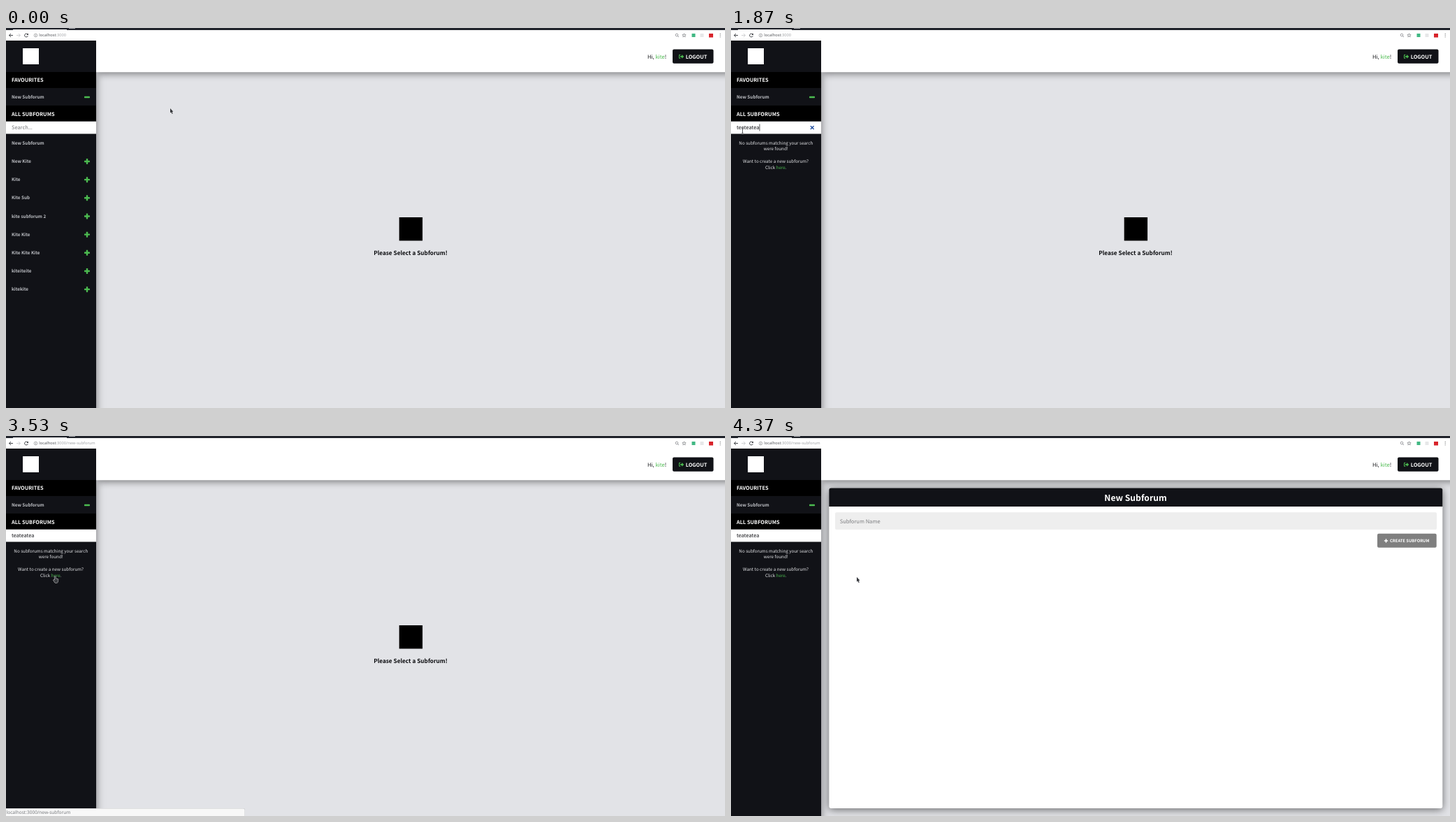
These frames come from a looping animation (1029 px wide and 544 px high, 4630 ms). An HTML page with a canvas:

```html
<!DOCTYPE html>
<html lang="en">
<head>
<meta charset="utf-8">
<title>Forum search</title>
<style>
html, body { margin: 0; width: 100%; height: 100%; overflow: hidden; background: #e2e3e7; }
canvas { display: block; width: 1029px; height: 544px; }
</style>
</head>
<body>
<canvas id="stage" width="1029" height="544"></canvas>
<script>
const ctx = document.getElementById('stage').getContext('2d');
const LOOP = 4630;
const SANS = '"Noto Sans CJK JP", "Noto Sans CJK SC", "Noto Sans", sans-serif';
const UI = '"Noto Sans", "Open Sans", sans-serif';
const INK = '#111217', GREEN = '#4cbb50', PAGE = '#e2e3e7', MUTED = '#bcbec3';

const KEYS = [1100, 1170, 1230, 1430, 1670, 1730, 1770, 1830, 1870];
const QUERY = 'teateatea';
const FORUMS = ['New Subforum', 'New Kite', 'Kite', 'Kite Sub', 'kite subforum 2',
  'Kite Kite', 'Kite Kite Kite', 'kiteiteite', 'kitekite'];
const T = { focus: 700, narrowed: 1170, empty: 1270, hover: 2870, click: 3420, route: 3500, page: 3600, idle: 4270 };

// time, x, y of the pointer's hot spot
const PATH = [
  [0, 235, 115], [130, 235, 115], [630, 16, 146], [2080, 16.5, 147],
  [2600, 70, 191], [2630, 70.5, 195], [2900, 70, 201],
  [3800, 70, 201], [4110, 180, 202], [LOOP, 180, 202]
];

const clamp = v => Math.max(0, Math.min(1, v));
const span = (t, a, b) => clamp((t - a) / (b - a));
const smooth = v => v * v * (3 - 2 * v);

function rect(x, y, w, h, color, radius = 0) {
  ctx.fillStyle = color;
  ctx.beginPath();
  ctx.roundRect(x, y, w, h, radius);
  ctx.fill();
}

function line(points, color, width, close) {
  ctx.beginPath();
  points.forEach(([x, y]) => ctx.lineTo(x, y));
  if (close) ctx.closePath();
  ctx.strokeStyle = color;
  ctx.lineWidth = width;
  ctx.stroke();
}

function ring(x, y, r, color, width, from = 0, to = Math.PI * 2) {
  ctx.beginPath();
  ctx.arc(x, y, r, from, to);
  ctx.strokeStyle = color;
  ctx.lineWidth = width;
  ctx.stroke();
}

// y is the middle of the capitals; returns the x where the text ends
function text(str, x, y, size, color, { weight = 400, align = 'left', font = SANS } = {}) {
  ctx.font = `${weight} ${size}px ${font}`;
  ctx.textAlign = align;
  ctx.fillStyle = color;
  ctx.fillText(str, x, y + size * 0.37);
  return x + ctx.measureText(str).width;
}

function shadowed(blur, dy, alpha, draw) {
  ctx.save();
  ctx.shadowColor = `rgba(0,0,0,${alpha})`;
  ctx.shadowBlur = blur;
  ctx.shadowOffsetY = dy;
  draw();
  ctx.restore();
}

function plus(x, y, size, color) {
  const bar = size * 0.3;
  rect(x - size / 2, y - bar / 2, size, bar, color, 0.6);
  rect(x - bar / 2, y - size / 2, bar, size, color, 0.6);
}

function drawBrowser(t) {
  rect(0, 0, 1029, 18, '#fff');
  rect(0, 0, 1029, 3, '#20232b');
  rect(10, 2, 77, 1, '#f2f2f2');
  rect(90, 0, 9, 1, '#a9abb0');

  const dark = '#4a4c50';
  line([[10, 10.5], [4.5, 10.5]], dark, 1);
  line([[7, 8], [4.5, 10.5], [7, 13]], dark, 1);
  line([[15, 10.5], [20.5, 10.5]], '#d0d1d3', 1);
  line([[18, 8], [20.5, 10.5], [18, 13]], '#d0d1d3', 1);
  ring(29, 10.5, 2.4, dark, 1, 0.3, 5.4);
  rect(30, 8, 2, 2, dark);
  ring(42.5, 10.5, 2.3, '#77797d', 0.6);
  rect(42.2, 10, 0.7, 1.8, '#77797d');
  rect(42.2, 8.9, 0.7, 0.7, '#77797d');

  const host = text('localhost', 47.3, 10.3, 5.72, '#55575b', { font: UI });
  text(':3000' + (t >= T.route ? '/new-subforum' : ''), host, 10.3, 5.72, '#a3a5a8', { font: UI });

  ring(960, 10, 1.8, '#77797d', 0.7);
  line([[961.3, 11.3], [963, 13]], '#77797d', 0.8);
  const star = Array.from({ length: 10 }, (_, i) => {
    const r = i % 2 ? 1.2 : 2.8, a = i * Math.PI / 5 - Math.PI / 2;
    return [970.5 + r * Math.cos(a), 10.6 + r * Math.sin(a)];
  });
  line(star, '#66686c', 0.6, true);
  rect(981.5, 8, 5, 5, '#41b883');
  rect(993.5, 8, 5, 5, '#e6e7e8');
  rect(1006, 8, 6, 5.5, '#d8232a');
  for (const y of [8.3, 10.5, 12.7]) rect(1021.6, y - 0.5, 1.1, 1.1, dark, 0.55);
}

function drawHeader() {
  shadowed(11, 2, 0.55, () => rect(129, 18, 920, 45.3, '#fff'));
  const name = text('Hi, ', 918, 41, 7.6, '#15161a');
  const end = text('kite', name, 41, 7.6, GREEN);
  text('!', end, 41, 7.6, '#15161a');

  rect(954, 30.5, 58.5, 20.3, INK, 2);
  line([[965.3, 38.4], [963.5, 38.4], [963.5, 43.3], [965.3, 43.3]], GREEN, 1);
  rect(965, 40, 2.8, 1.8, GREEN);
  ctx.beginPath();
  ctx.moveTo(967.2, 38);
  ctx.lineTo(970.2, 40.9);
  ctx.lineTo(967.2, 43.8);
  ctx.fill();
  text('LOGOUT', 972.7, 41, 7.36, '#fff', { weight: 600 });
}

function drawWelcome() {
  rect(562.7, 271, 33.4, 33.4, '#000');
  text('Please Select a Subforum!', 579, 322, 8.25, '#0c0d10', { weight: 600, align: 'center' });
}

function drawForm() {
  shadowed(12, 2, 0.55, () => rect(140.3, 74.5, 878, 458.5, '#fff', 3));
  rect(140.3, 74.5, 878, 26.5, INK, [3, 3, 0, 0]);
  text('New Subforum', 579, 88, 12.2, '#fff', { weight: 600, align: 'center' });
  rect(149, 109.3, 861, 24.7, '#eee', 2);
  text('Subforum Name', 155.7, 121.8, 7.57, '#7b7c7f');
  rect(925, 139.7, 84.7, 20, '#7f7f7f', 2);
  plus(937.5, 150, 5.4, '#fff');
  text('CREATE SUBFORUM', 943, 149.8, 5.85, '#fff', { weight: 600 });
}

function drawResults(t) {
  if (t < T.empty) {
    const rows = FORUMS.slice(t < T.narrowed ? 0 : 1);
    rows.forEach((name, i) => {
      const y = 164.5 + i * 26.17;
      text(name, 8, y, 6.36, MUTED, { weight: 600 });
      if (name !== FORUMS[0]) plus(116, y + 0.3, 8, GREEN);
    });
    return;
  }
  const center = { align: 'center' }, pale = '#e4e5e8';
  text('No subforums matching your search', 64.3, 164.2, 6.3, pale, center);
  text('were found!', 64.3, 173, 6.3, pale, center);
  text('Want to create a new subforum?', 64, 190.7, 6.3, pale, center);
  const link = text('Click ', 49, 199.5, 6.3, pale);
  const end = text('here', link, 199.5, 6.3, GREEN);
  text('.', end, 199.5, 6.3, pale);
}

function drawSearch(t) {
  rect(0, 133.7, 129, 17.8, '#fff');
  const typed = QUERY.slice(0, KEYS.filter(k => k <= t).length);
  const end = typed ? text(typed, 8, 142.5, 7.45, '#17181c') : 8;
  if (!typed) text('Search...', 8, 142.5, 7.45, '#77787b');

  if (t >= T.click) return;
  const lastKey = Math.max(T.focus, ...KEYS.filter(k => k <= t));
  const blinkOn = typed ? Math.floor((t - lastKey) / 500) % 2 === 0 : t < T.focus + 400;
  if (t >= T.focus && blinkOn) rect(end + 0.2, 137.5, 0.7, 10, '#111');
  if (typed) {
    line([[113.8, 140.2], [118.6, 145]], '#2450a0', 1.4);
    line([[118.6, 140.2], [113.8, 145]], '#2450a0', 1.4);
  }
}

function drawSidebar(t) {
  shadowed(11, 2, 0.5, () => rect(0, 63, 129, 500, INK));
  rect(0, 18, 129, 526, INK);
  rect(24, 29, 23, 23, '#fff');
  rect(0, 63, 129, 22.7, '#000');
  text('FAVOURITES', 8, 74.5, 7.4, '#fff', { weight: 600 });
  text('New Subforum', 8, 98.7, 6.36, MUTED, { weight: 600 });
  rect(112, 97.8, 8, 2.4, GREEN, 0.6);
  rect(0, 111, 129, 22.7, '#000');
  text('ALL SUBFORUMS', 8, 122.8, 7.4, '#fff', { weight: 600 });
  drawSearch(t);
  drawResults(t);
}

function drawProgress(t) {
  if (t < 3570 || t > 4350) return;
  ctx.globalAlpha = span(t, 3570, 3700) * (1 - span(t, 4150, 4350));
  const width = t < 3600 ? 480 * span(t, 3570, 3600) : 480 + 549 * smooth(span(t, 3600, 3930));
  rect(0, 18, width, 1, GREEN);
  ctx.globalAlpha = 1;
}

function drawStatus(t) {
  if (t < T.hover || t >= T.idle) return;
  const width = t < T.click ? 136 : 342;
  rect(0, 533, width, 11, '#c9cacc', [0, 2, 0, 0]);
  rect(0, 533.5, width - 0.5, 10.5, '#f8f8f8', [0, 2, 0, 0]);
  text('localhost:3000/new-subforum', 0.6, 538.7, 6.54, '#77797d', { font: UI });
}

function pointerAt(t) {
  const i = PATH.findIndex(p => p[0] > t);
  const [t0, x0, y0] = PATH[i - 1], [t1, x1, y1] = PATH[i];
  const k = smooth(span(t, t0, t1));
  return [x0 + (x1 - x0) * k, y0 + (y1 - y0) * k];
}

function outlined(points, fill, edge) {
  line(points, edge, 1, true);
  ctx.fillStyle = fill;
  ctx.fill();
}

function drawPointer(t) {
  const [x, y] = pointerAt(t);
  const at = ([dx, dy]) => [x + dx, y + dy];
  const overLink = t >= 2700 && x < 80;
  const overText = !overLink && x < 129 && y > 134 && t < T.click;

  if (overLink) {
    const hand = [[-0.6, 0], [0.7, 0], [1, 3], [4.7, 4], [4.5, 6.5], [3.5, 9], [0, 9], [-2.3, 5.2], [-1.5, 4.5], [-0.5, 5.5]];
    outlined(hand.map(at), '#3c3e42', '#e8e8ea');
  } else if (overText) {
    const strokes = [[[-1.7, -4], [1.7, -4]], [[0, -4], [0, 4]], [[-1.7, 4], [1.7, 4]]];
    for (const [color, width] of [['#f4f4f5', 1.8], ['#34363a', 0.8]])
      strokes.forEach(s => line(s.map(at), color, width));
  } else {
    const arrow = [[0, 0], [0, 6.6], [1.5, 5.5], [2.6, 8], [3.7, 7.5], [2.7, 5.1], [4.4, 4.7]];
    outlined(arrow.map(at), '#36383c', '#f0f0f2');
  }
}

function render(t) {
  ctx.textRendering = 'geometricPrecision';
  ctx.lineJoin = 'round';
  rect(0, 0, 1029, 544, PAGE);
  if (t < T.page) drawWelcome();
  else drawForm();
  drawSidebar(t);
  drawHeader();
  rect(0, 18, 129, 45, INK);
  rect(24, 29, 23, 23, '#fff');
  rect(0, 63, 129, 22.7, '#000');
  text('FAVOURITES', 8, 74.5, 7.4, '#fff', { weight: 600 });
  drawBrowser(t);
  drawProgress(t);
  drawStatus(t);
  drawPointer(t);
}

const start = performance.now();
function tick() {
  render((performance.now() - start) % LOOP);
  requestAnimationFrame(tick);
}
tick();
</script>
</body>
</html>
```
